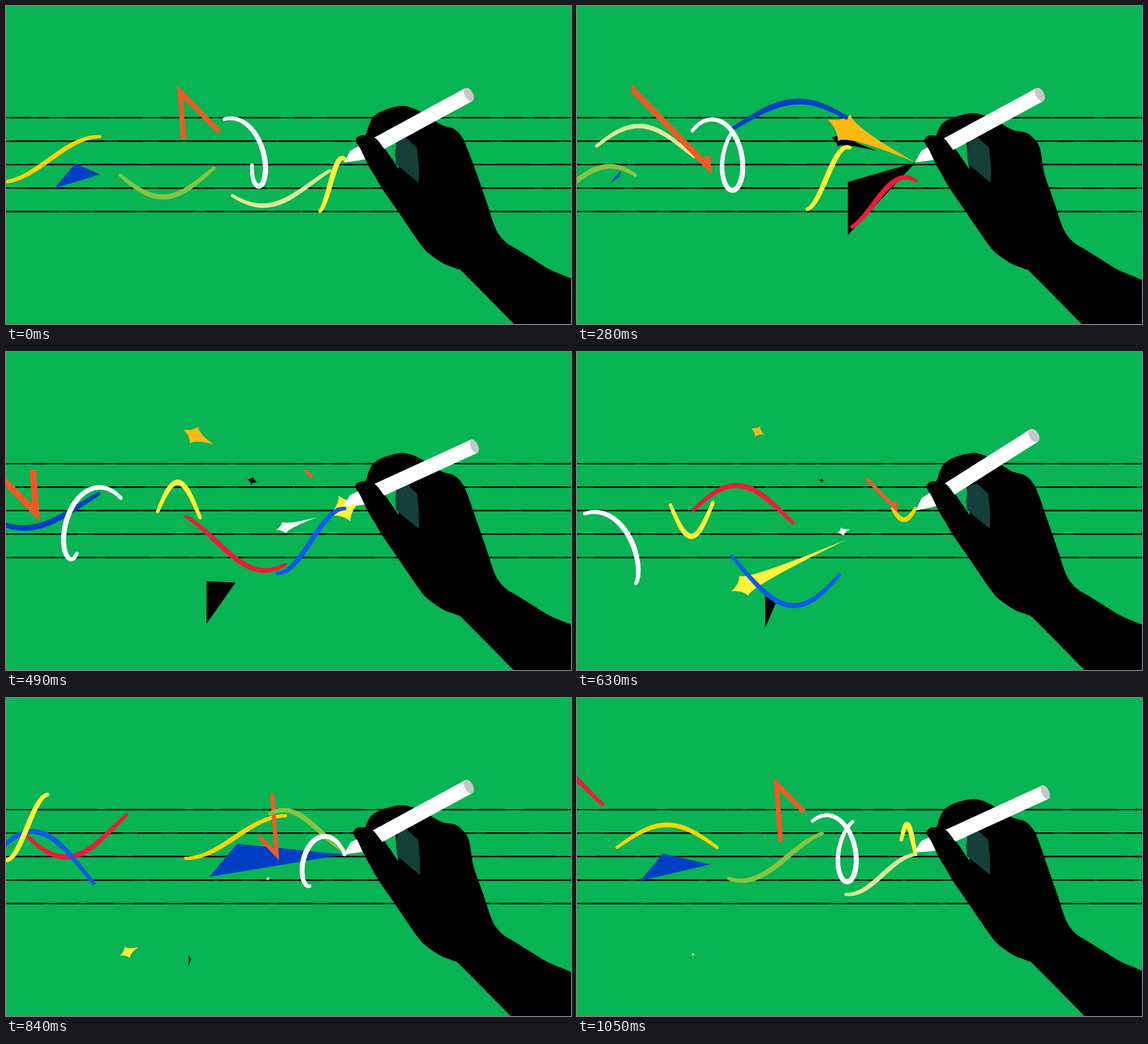
These frames come from a looping animation (998x561 px, 1.12 s). An HTML page with a canvas:

```html
<!DOCTYPE html>
<html lang="en">
<head>
<meta charset="utf-8">
<title>Drawing hand</title>
<style>
html, body { margin: 0; width: 100%; height: 100%; overflow: hidden; background: #08b454; }
canvas { display: block; }
</style>
</head>
<body>
<canvas id="stage" width="998" height="561"></canvas>
<script>
const ctx = document.getElementById('stage').getContext('2d');
const STEP = 70, STEPS = 16;
const GREEN = '#08b454';
const NIB = { x: 598, y: 276 };
const { PI, sin, cos, min, max, sqrt } = Math;
const items = [];

const mix = (a, b, k) => a + (b - a) * k;
const quad = ([a, b, c], k) => mix(mix(a, b, k), mix(b, c, k), k);

const pairs = list => {
  const out = [];
  for (let i = 0; i < list.length; i += 2) out.push([list[i], list[i + 1]]);
  return out;
};

function trace(pts) {
  ctx.beginPath();
  pts.forEach(p => ctx.lineTo(p[0], p[1]));
}

function fill(pts, color) {
  ctx.fillStyle = color;
  trace(pts);
  ctx.closePath();
  ctx.fill();
}

// Closed smooth outline through the points (Catmull-Rom).
function blob(pts, color) {
  const n = pts.length, get = i => pts[(i + n) % n];
  ctx.fillStyle = color;
  ctx.beginPath();
  ctx.moveTo(...pts[0]);
  for (let i = 0; i < n; i++) {
    const [a, b, c, d] = [get(i - 1), get(i), get(i + 1), get(i + 2)];
    ctx.bezierCurveTo(b[0] + (c[0] - a[0]) / 6, b[1] + (c[1] - a[1]) / 6,
      c[0] - (d[0] - b[0]) / 6, c[1] - (d[1] - b[1]) / 6, ...c);
  }
  ctx.fill();
}

// A stroke that leaves the nib, then slides left while snaking along a sine.
// "y" is the path of its middle line; "curl" turns the sine into loops.
function wave(color, o) {
  const { speed, ease = 1, len, y, amp, phase, span = () => PI, curl = 0, width = 9 } = o;
  items.push({ ...o, draw(age) {
    const grow = age / (age + 0.5);
    const tail = NIB.x - max(speed * age ** ease, grow * len / 2);
    const head = min(NIB.x, tail + len);
    const mid = quad(y, age / o.life), high = amp * grow;
    const point = u => {
      const p = phase(age) + span(age) * (u - 0.5);
      return [mix(tail, head, u) - curl * high * cos(p), mid - high * sin(p)];
    };
    const end = point(1), pin = max(0, min(1, (2.9 - age) / 1.5));
    const dx = (NIB.x - end[0]) * pin, dy = (NIB.y - end[1]) * pin;
    ctx.save();
    ctx.translate(dx, dy);
    ctx.strokeStyle = color;
    ctx.lineCap = 'round';
    for (let i = 0; i < 60; i++) {
      ctx.lineWidth = width * (0.68 + 0.32 * sin(PI * i / 60));
      trace([point(i / 60), point((i + 1) / 60)]);
      ctx.stroke();
    }
    ctx.restore();
  } });
}

// Point on the way from the nib (k = 1) to a resting place (k = 0).
const along = (rest, k) => [mix(rest[0], NIB.x, min(1, k)), mix(rest[1], NIB.y, min(1, k))];

// Four-pointed star flying to rest; one tip is a tail that reaches back to the nib.
function star(color, born, rest, size) {
  items.push({ born, life: 9, draw(age) {
    const k = 0.48 ** age, r = size * (1 - age / 9);
    const c = along(rest, k), tip = along(rest, 3 * k);
    const tail = max(r, Math.hypot(tip[0] - c[0], tip[1] - c[1]));
    const arms = [tail, r * 0.8, r, r * 0.8];
    ctx.save();
    ctx.translate(...c);
    ctx.rotate(Math.atan2(NIB.y - rest[1], NIB.x - rest[0]));
    ctx.fillStyle = color;
    ctx.beginPath();
    ctx.moveTo(tail, 0);
    for (let i = 1; i <= 4; i++) {
      const turn = i * PI / 2, bend = turn - PI / 4, inner = r * 0.36;
      const arm = arms[i % 4];
      ctx.quadraticCurveTo(inner * cos(bend), inner * sin(bend), arm * cos(turn), arm * sin(turn));
    }
    ctx.fill();
    ctx.restore();
  } });
}

// Triangle flying to rest: a short side at "angle" and a point drawn out to the nib.
function shard(color, born, life, rest, size, angle) {
  items.push({ born, life, draw(age) {
    const k = 0.6 ** age, half = size / 2 * sqrt(1 - age / life) * min(1, age);
    const [x, y] = along(rest, k);
    const dx = half * cos(angle), dy = half * sin(angle);
    fill([[x - dx, y - dy], [x + dx, y + dy], along(rest, 2.5 * k)], color);
  } });
}

// A window sliding along a zigzag while the zigzag itself drifts left.
function zigzag(color, born, life) {
  items.push({ born, life, draw(age) {
    const corner = i => {
      const n = Math.floor(i / 2);
      return i % 2 ? [n * 121, n * 8] : [n * 121 - 130, n * 8 - 133];
    };
    const spot = s => {
      const i = Math.floor(s), a = corner(i), b = corner(i + 1);
      return [mix(a[0], b[0], s - i), mix(a[1], b[1], s - i)];
    };
    const mid = 0.46 + 0.155 * age, half = min(1.2, age * 0.2) / 2;
    const pts = [spot(mid - half)];
    for (let i = Math.ceil(mid - half); i < mid + half; i++) pts.push(corner(i));
    pts.push(spot(mid + half));
    ctx.save();
    ctx.translate(NIB.x - 8.4 * age ** 1.56, 276);
    ctx.strokeStyle = color;
    ctx.lineCap = 'butt';
    ctx.lineWidth = 5.5 + 0.38 * age;
    trace(pts);
    ctx.stroke();
    ctx.restore();
  } });
}

shard('#003fc3', 11, 10.5, [62, 302], 80, -0.87);
shard('#000', 2.9, 9.5, [320, 465], 100, -1.57);
star('#000', 1.8, [431, 226], 21);
star('#fdb913', 3.2, [315, 138], 36);
star('#fff', 4.9, [462, 319], 18);
star('#fff33b', 7, [204, 453], 31);
wave('#ee1b3a', { born: 2, life: 14.9, speed: 56, len: 175, y: [440, 280, 120], amp: 58, phase: a => 2.5 - a });
wave('#003fc3', { born: 0.87, life: 8, speed: 104, len: 203, y: [170, 200, 320], amp: 45, phase: a => 3.8 - 0.8 * a, width: 10 });
wave('#0f5bea', { born: 5.85, life: 8, speed: 103, len: 190, y: [400, 400, 250], amp: 82, phase: a => 1.03 - 0.9 * a });
wave('#ffd400', { born: 8.57, life: 11, speed: 82, len: 177, y: [230, 250, 300], amp: 43, phase: a => 5.39 - PI / 2 * a, width: 8 });
wave('#dcea96', { born: 13.6, life: 8.5, speed: 88, len: 172, y: [330, 330, 200], amp: 48, phase: a => 1.13 - 0.88 * a, width: 8 });
zigzag('#f15a24', 6.5, 20);
wave('#84c441', { born: 10, life: 13, speed: 66, len: 165, y: [180, 340, 335], amp: 48, phase: a => 4.57 - a });
wave('#fff', {
  born: 11, life: 16.5, speed: 41, len: 72, y: [330, 140, 420], amp: 66, curl: 0.55,
  phase: a => 3.3 + 0.11 * (a - 6.7) ** 2,
  span: a => 5 + 2 * cos((a - 3) * 0.9)
});
wave('#fff33b', { born: 14, life: 15.7, speed: 17, ease: 1.35, len: 75, y: [300, 340, 200], amp: 60, phase: a => 3.5 - 1.6 * a });

// Outline of the hand: the arm is fixed, the fingers bend with each stroke.
const FINGERS = pairs([619, 240, 623, 230, 635, 227, 641, 210, 650, 194, 670, 183, 698, 176,
  718, 180, 740, 191, 768, 209, 792, 217, 806, 232, 815, 252]);
const ARM = pairs([832, 297, 849, 346, 863, 388, 873, 406, 886, 419, 906, 431, 952, 460, 1070, 537,
  1070, 740, 983, 650, 897, 561, 811, 474, 797, 464, 774, 455, 750, 439, 732, 420, 690, 359, 660, 315, 640, 276]);
const THUMB = pairs([619, 240, 622, 231, 632, 228, 652, 233, 668, 252, 690, 283, 700, 320, 655, 303, 626, 252]);
const HOLE = pairs([664, 244, 688, 234, 694, 288]);
const SHADE = pairs([690, 236, 706, 232, 726, 250, 729, 282, 729, 312, 689, 279, 687, 262]);

function drawPen(swing) {
  const len = 251 - 6 * swing;
  ctx.save();
  ctx.translate(597 + 2.5 * swing, 276 + 5 * swing);
  ctx.rotate(-(28.5 + 5.5 * swing) * PI / 180);
  fill([[0, 0], [20, -13], [len, -13], [len, 13], [36, 13], [25, 9.5]], '#fff');
  ctx.fillStyle = '#c7c7c9';
  ctx.beginPath();
  ctx.ellipse(len, 0, 7.5 + 1.3 * swing, 13, 0, 0, 7);
  ctx.fill();
  ctx.restore();
}

function drawHand(step) {
  const turn = step * PI / 4, bend = (1 - cos(turn)) / 2;
  const move = (pts, x) => pts.map(p => [p[0] + x * bend, p[1]]);
  const fingers = FINGERS.map(([x, y], i) => {
    const u = i / (FINGERS.length - 1);
    return [x + mix(-5, 3, u) * bend, y + 13 * bend * sin(PI * u)];
  });
  blob([...fingers, ...move(ARM, -6)], '#000');
  fill(move(HOLE, -1), GREEN);
  fill(move(SHADE, 2), '#143f3a');
  drawPen(sin(turn));
  blob(move(THUMB, -5), '#000');
}

function drawStaff(step) {
  let seed = 77 + step * 131;
  const rand = () => (seed = seed * 16807 % 2147483647) / 2147483647;
  rand();
  ctx.fillStyle = '#000';
  for (let i = 0; i < 5; i++) {
    const y = 197 + i * 41.4;
    ctx.fillRect(0, y - 1, 998, 2);
    for (let x = rand() * 60; x < 998;) {
      const w = 20 + rand() * 90;
      ctx.fillRect(x, y - 1.3, w, 2.6);
      x += w + rand() * 35;
    }
  }
}

function draw(step) {
  ctx.fillStyle = GREEN;
  ctx.fillRect(0, 0, 998, 561);
  drawStaff(step);
  for (const item of items) {
    for (const age of [step + STEPS - item.born, step - item.born]) {
      if (age >= 0 && age <= item.life) item.draw(age);
    }
  }
  drawHand(step);
}

function tick() {
  draw(Math.floor(performance.now() / STEP) % STEPS);
  requestAnimationFrame(tick);
}
tick();
</script>
</body>
</html>
```
